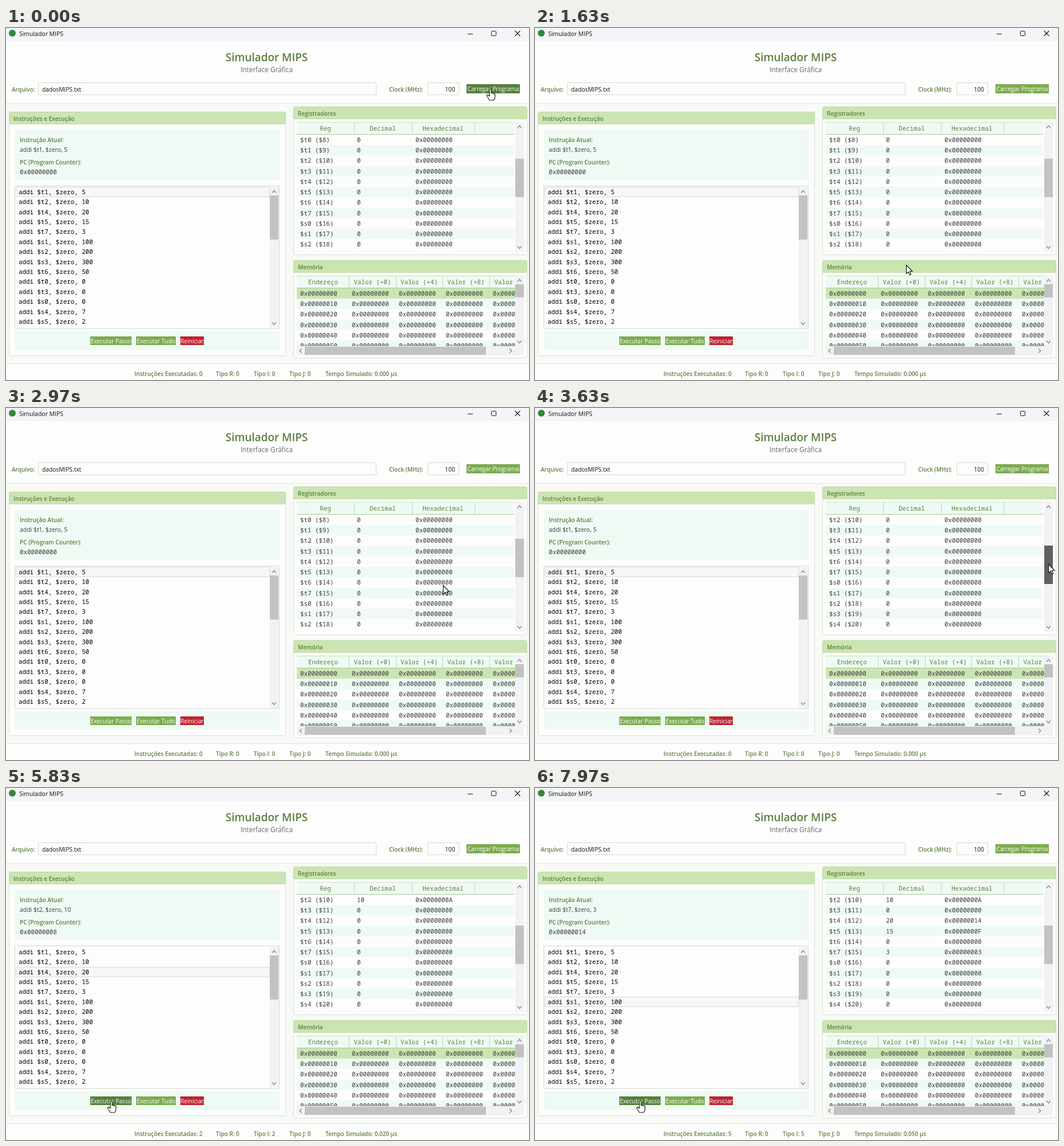
Write an HTML page with a canvas that moves like this. It is 912 by 614 pixels and loops after 8000 ms.

```html
<!DOCTYPE html>
<html lang="pt">
<head>
<meta charset="utf-8">
<title>Simulador MIPS</title>
<style>
  html, body { margin: 0; width: 100%; height: 100%; overflow: hidden; background: #f8faf6; }
  canvas { display: block; }
</style>
</head>
<body>
<canvas id="stage" width="912" height="614"></canvas>
<script>
const ctx = document.getElementById('stage').getContext('2d');
const LOOP = 8000;
const SANS = '"Open Sans", "Noto Sans", sans-serif';
const MONO = '10.8px "Noto Sans Mono", "DejaVu Sans Mono", monospace';
const GREEN = '#5d7f3e', LEAF = '#7cab4e', DARK_LEAF = '#547f3a', HEAD = '#cbe5b2';
const MINT = '#eefaf3', WHITE = '#fdfdfd', EDGE = '#d5e3cf', INK = '#3c3c3c';

const program = [['t1', 5], ['t2', 10], ['t4', 20], ['t5', 15], ['t7', 3], ['s1', 100], ['s2', 200],
  ['s3', 300], ['t6', 50], ['t0', 0], ['t3', 0], ['s0', 0], ['s4', 7], ['s5', 2]];
const ROW = 17.4, LIST_TOP = 277.3;
const clicks = [4900, 5530, 6200, 6830, 7450];
const dialogTime = [300, 1350], dragTime = [3200, 3750];
// Pointer path: time, x, y
const path = [[0, 844, 105], [300, 844, 105], [870, 729, 274], [1200, 757, 392], [1450, 757, 392],
  [2170, 318, 476], [2300, 270, 490], [2550, 330, 470], [3100, 895, 260], [3200, 895, 260],
  [3500, 895, 272], [3750, 895, 272], [4300, 183, 536], [4430, 183, 538], [4600, 183, 545]];
const buttons = [
  ['Carregar Programa', 803, 98, 93, 16], ['Executar Passo', 147, 538, 72, 15],
  ['Executar Tudo', 227, 538, 69, 15], ['Reiniciar', 304, 538, 41, 15, '#c21f30', '#961626']];

const within = (t, [a, b]) => t >= a && t < b;
const instruction = ([reg, value]) => `addi $${reg}, $zero, ${value}`;
const hex = n => '0x' + n.toString(16).toUpperCase().padStart(8, '0');

function pointer(t) {
  const i = path.findIndex(p => p[0] > t);
  if (i < 1) return (i < 0 ? path[path.length - 1] : path[0]).slice(1);
  const [a, b] = [path[i - 1], path[i]], k = (t - a[0]) / (b[0] - a[0]);
  return [a[1] + (b[1] - a[1]) * k, a[2] + (b[2] - a[2]) * k];
}

function box(x, y, w, h, fill, edge, radius = 0) {
  ctx.beginPath();
  const o = edge ? .5 : 0;
  ctx.roundRect(x + o, y + o, w - 2 * o, h - 2 * o, radius);
  if (fill) { ctx.fillStyle = fill; ctx.fill(); }
  if (edge) { ctx.strokeStyle = edge; ctx.lineWidth = 1; ctx.stroke(); }
}

function line(color, width, ...points) {
  ctx.beginPath();
  points.forEach(([x, y]) => ctx.lineTo(x, y));
  ctx.strokeStyle = color;
  ctx.lineWidth = width;
  ctx.stroke();
}

// y is the middle of the capital letters
function write(text, x, y, font, size, color, align = 'left') {
  ctx.font = font;
  ctx.fillStyle = color;
  ctx.textAlign = align;
  ctx.fillText(text, x, Math.round(y + size * .36));
}
const sans = (text, x, y, size = 10.2, color = INK, align) =>
  write(text, x, y, `${size}px ${SANS}`, size, color, align);
const label = (text, x, y, size = 10, align) =>
  write(text, x, y, `600 ${size}px ${SANS}`, size, GREEN, align);
const mono = (text, x, y, color = INK, align) => write(text, x, y, MONO, 10.8, color, align);

function clipped(x, y, w, h, draw) {
  ctx.save();
  ctx.beginPath();
  ctx.rect(x, y, w, h);
  ctx.clip();
  draw();
  ctx.restore();
}

function chevron(x, y, dx, dy) {
  line('#858585', 1.2, [x - 3.5 * dy - 2 * dx, y - 3.5 * dx - 2 * dy],
    [x + 2 * dx, y + 2 * dy], [x + 3.5 * dy - 2 * dx, y + 3.5 * dx - 2 * dy]);
}

function scrollbar(x, top, bottom, thumbTop, thumbHeight, color = '#c2c2c2') {
  box(x, top, 16, bottom - top, '#f2f2f4');
  box(x, thumbTop, 15, thumbHeight, color);
  chevron(x + 7.5, top + 8.5, 0, -1);
  chevron(x + 7.5, bottom - 7.5, 0, 1);
}

function panel(title, x, y, w, h) {
  box(x, y, w, h, WHITE, EDGE, 3);
  box(x, y, w, 22, HEAD, '#bddca4', [3, 3, 0, 0]);
  label(title, x + 8, y + 12);
}

function tableHead(titles, x, y, w, separators) {
  box(x, y, w, 22, MINT);
  line('#c8dfc0', 1, [x, y + .5], [x + w, y + .5]);
  line('#a9caa0', 1, [x, y + 21.5], [x + w, y + 21.5]);
  separators.forEach(s => line('#bed8b4', 1, [s + .5, y + 1], [s + .5, y + 21]));
  titles.forEach(([text, center]) => mono(text, center, y + 11, GREEN, 'center'));
}

function windowFrame(active) {
  const color = active ? '#111' : '#8c8c8c';
  box(0, 0, 912, 614, '#f8faf6');
  box(0, 0, 912, 23, '#f4f5f8');
  ctx.beginPath();
  ctx.arc(11, 9, 6, 0, 7);
  ctx.fillStyle = '#2f8a35';
  ctx.fill();
  sans('Simulador MIPS', 23, 10, 10.45, color);
  line(color, 1, [805, 10.5], [814, 10.5]);
  box(846, 5, 9, 9, null, color, 1);
  line(color, 1.1, [887.5, 5], [896.5, 14]);
  line(color, 1.1, [896.5, 5], [887.5, 14]);

  box(0, 23, 912, 108, WHITE);
  line('#dfe9d8', 1, [0, 131.5], [912, 131.5]);
  label('Simulador MIPS', 454.5, 51, 18.9, 'center');
  sans('Interface Gráfica', 454.5, 73, 11.8, '#666', 'center');
  label('Arquivo:', 10, 107);
  box(56, 95, 590, 22, WHITE, '#d3dec8');
  sans('dadosMIPS.txt', 63, 107, 10.2, '#111');
  label('Clock (MHz):', 668, 107);
  box(735, 95, 55, 22, WHITE, '#d3dec8');
  sans('100', 783, 107, 10.2, '#111', 'right');
}

function execution(steps, hoverRow) {
  panel('Instruções e Execução', 5, 146, 483, 426);
  box(15, 178, 462, 87, MINT);
  label('Instrução Atual:', 24, 195);
  sans(instruction(program[Math.max(0, steps - 1)]), 24, 212, 10.45);
  label('PC (Program Counter):', 24, 234);
  mono(hex(steps * 4), 24, 251);

  box(15, 275, 462, 250, WHITE, '#d2d8d0');
  const rowBox = (i, fill, edge) => box(17, Math.round(LIST_TOP + i * ROW), 443, 18, fill, edge);
  rowBox(steps, '#f7f7f7', '#dadada');
  if (hoverRow >= 0) rowBox(hoverRow, '#e6f5fb', '#7cc6cf');
  program.forEach((item, i) => mono(instruction(item), 22, 286 + i * ROW, '#000'));
  scrollbar(460, 277, 523, 292, 77);
  box(15, 529, 462, 32, MINT);
}

function registers(steps, scroll, dragging) {
  panel('Registradores', 501, 137, 408, 259);
  box(507, 164, 396, 225, WHITE);
  for (let i = 0; i < 11; i++) {
    const n = 8 + scroll + i, y = 195 + i * 18.25;
    const name = n < 16 ? 't' + (n - 8) : 's' + (n - 16);
    const written = program.slice(0, steps).find(p => p[0] === name);
    const value = written ? written[1] : 0;
    if (i % 2) box(507, Math.round(y - 9), 379, 18, MINT);
    mono(`$${name} ($${n})`, 513, y);
    mono(value, 612, y);
    mono(hex(value), 714, y);
  }
  tableHead([['Reg', 557], ['Decimal', 657], ['Hexadecimal', 762]], 507, 164, 379, [607, 708, 817]);
  scrollbar(888, 164, 390, 228 + scroll * 6, 67, dragging ? '#606060' : '#c2c2c2');
}

function memory() {
  panel('Memória', 501, 405, 408, 171);
  clipped(507, 432, 381, 123, () => {
    for (let i = 0; i < 6; i++) {
      const y = 463 + i * 18.25;
      box(507, Math.round(y - 9), 381, 18, i ? (i % 2 ? MINT : WHITE) : HEAD);
      mono(hex(i * 16), 513, y);
      for (let c = 0; c < 4; c++) mono(hex(0), 603 + c * 82, y);
    }
    tableHead([['Endereço', 553], ['Valor (+0)', 639], ['Valor (+4)', 720.5], ['Valor (+8)', 802],
      ['Valor (+C)', 884]], 507, 432, 381, [598, 680, 761, 843]);
  });
  scrollbar(888, 432, 555, 447, 23);
  box(507, 555, 396, 16, '#f2f2f4');
  box(521, 556, 316, 14, '#c2c2c2');
  chevron(514, 563, -1, 0);
  chevron(880, 563, 1, 0);
}

function statusBar(steps) {
  box(0, 585, 912, 29, WHITE);
  line('#d5e2d4', 1, [0, 585.5], [912, 585.5]);
  const time = steps ? `0,0${steps}0` : '0.000';
  [[`Instruções Executadas: ${steps}`, 224], ['Tipo R: 0', 366], [`Tipo I: ${steps}`, 432],
    ['Tipo J: 0', 494], [`Tempo Simulado: ${time} µs`, 557]].forEach(([text, x]) => label(text, x, 603));
}

function dialog() {
  ctx.save();
  ctx.shadowColor = 'rgba(0,0,0,.36)';
  ctx.shadowBlur = 26;
  ctx.shadowOffsetY = 9;
  box(435, 276, 372, 136, WHITE, null, 7);
  ctx.restore();
  box(435, 276, 372, 27, '#f4f5f8', null, [7, 7, 0, 0]);
  box(435, 374, 372, 38, '#f0f0f1', null, [0, 0, 7, 7]);
  box(435, 276, 372, 136, null, '#a9a9a9', 7);
  sans('Sucesso', 443, 290, 10.2, '#111');
  line('#222', 1.1, [789, 285], [797, 293]);
  line('#222', 1.1, [797, 285], [789, 293]);

  const blue = ctx.createLinearGradient(0, 324, 0, 353);
  blue.addColorStop(0, '#6f93e0');
  blue.addColorStop(.5, '#2350bd');
  blue.addColorStop(1, '#2c62d0');
  ctx.beginPath();
  ctx.arc(468.5, 338.5, 13.5, 0, 7);
  ctx.fillStyle = blue;
  ctx.fill();
  ctx.strokeStyle = '#a5adbd';
  ctx.lineWidth = 1.5;
  ctx.stroke();
  write('i', 468.5, 338.5, 'bold 22px "Liberation Serif", serif', 20, '#fff', 'center');

  sans('Programa carregado com sucesso! 39 instruções encontradas.', 491, 333, 9.9, '#000');
  sans('Clock definido para 100 MHz.', 491, 345, 9.9, '#000');
  box(725, 383, 68, 21, '#f0f0f0', '#555');
  line('#fff', 1, [726.5, 402], [726.5, 384.5], [791, 384.5]);
  line('#777', 1, [727, 402.5], [791.5, 402.5], [791.5, 385]);
  sans('OK', 759, 393.5, 10, '#000', 'center');
}

const arrowShape = new Path2D('M0 0V15L3.5 11.8L6 17.5L8.2 16.5L5.8 11H10.6Z');
const handShape = new Path2D('M-1.5 1.5Q0-1 1.5 1.5V8Q3 6.8 4 8.5Q5.5 7.5 6.3 9.2Q8.3 8.6 8.3 10.5' +
  'V15Q8 18 6 20.5H-1.5Q-2.5 18-6 13.5Q-7 11-4.5 11L-1.5 13.5Z');

function cursor(x, y, shape) {
  ctx.save();
  ctx.translate(Math.round(x) + .5, Math.round(y) + .5);
  ctx.fillStyle = '#fff';
  ctx.strokeStyle = '#111';
  ctx.lineWidth = 1.1;
  ctx.lineJoin = 'round';
  ctx.fill(shape);
  ctx.stroke(shape);
  ctx.restore();
}

function render(t) {
  const modal = within(t, dialogTime);
  const steps = clicks.filter(c => c <= t).length;
  const [x, y] = pointer(t);
  const [hx, hy] = pointer(t - 90); // hover effects trail the pointer
  const overList = !modal && hx > 17 && hx < 460 && hy > LIST_TOP && hy < 521;
  const hot = modal ? -1 : buttons.findIndex(([, bx, by, w, h]) =>
    hx >= bx && hx < bx + w && hy >= by && hy < by + h);
  const scroll = t < 3200 ? 0 : Math.min(2, Math.floor((t - 3200) / 140));

  windowFrame(!modal);
  execution(steps, overList ? Math.floor((hy - LIST_TOP) / ROW) : -1);
  registers(steps, scroll, within(t, dragTime));
  memory();
  statusBar(steps);
  buttons.forEach(([text, bx, by, w, h, color = LEAF, hover = DARK_LEAF], i) => {
    box(bx, by, w, h, i === hot ? hover : color);
    sans(text, bx + w / 2, by + h / 2 + .5, 10.1, '#fff', 'center');
  });
  if (modal) dialog();
  cursor(x, y, hot < 0 ? arrowShape : handShape);
}

function tick() {
  render(performance.now() % LOOP);
  requestAnimationFrame(tick);
}
tick();
</script>
</body>
</html>
```
